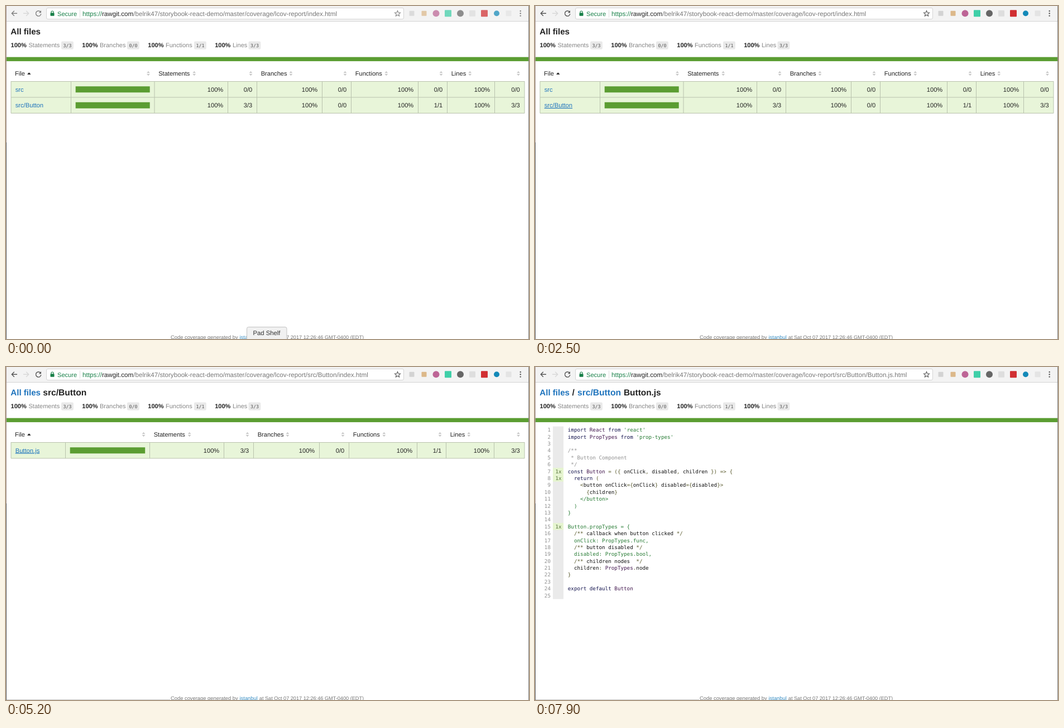
Animation of 937 by 598 pixels, one loop 8 s. Source, as an HTML page:

```html
<!DOCTYPE html>
<html lang="en">
<head>
<meta charset="utf-8">
<title>Coverage report</title>
<style>
html, body { margin: 0; width: 100%; height: 100%; overflow: hidden; background: #fff; }
svg { display: block; width: 937px; height: 598px; font-family: "Liberation Sans", Arial, sans-serif; text-rendering: geometricPrecision; }
.mono { font-family: "DejaVu Sans Mono", monospace; white-space: pre; }
</style>
</head>
<body>
<svg id="stage" viewBox="0 0 937 598" xmlns="http://www.w3.org/2000/svg"></svg>
<script>
const LOOP = 8000;
const GREEN = '#5b9d32', PALE = '#e8f5d9', RULE = '#b9c2ad', LINK = '#1f74bd', INK = '#222';

const rect = (x, y, w, h, fill, more = '') =>
  `<rect x="${x}" y="${y}" width="${w}" height="${h}" fill="${fill}" ${more}/>`;
const path = (d, stroke, width = 1, more = '') =>
  `<path d="${d}" fill="none" stroke="${stroke}" stroke-width="${width}" ${more}/>`;
const shape = (d, fill) => `<path d="${d}" fill="${fill}"/>`;
const dot = (x, y, r, fill) => `<circle cx="${x}" cy="${y}" r="${r}" fill="${fill}"/>`;
const text = (x, y, size, fill, content, more = '') =>
  `<text x="${x}" y="${y}" font-size="${size}" fill="${fill}" ${more}>${content}</text>`;
const group = (id, content) => `<g id="${id}">${content}</g>`;
const BOLD = 'font-weight="700"', END = 'text-anchor="end"';

function toolbar() {
  const star = Array.from({ length: 10 }, (_, i) => {
    const a = -Math.PI / 2 + i * Math.PI / 5, r = i % 2 ? 2.4 : 5.3;
    return `${(701.5 + r * Math.cos(a)).toFixed(1)} ${(13.7 + r * Math.sin(a)).toFixed(1)}`;
  }).join('L');
  const square = (x, size, fill) => rect(x - size / 2, 13.3 - size / 2, size, size, fill, 'rx="1"');
  const icons = square(727, 9, '#d3d3d3') + square(749, 9, '#dcb88a') + dot(770.5, 13.3, 6, '#bd6596') +
    square(792, 12, '#3fcfa8') + dot(814, 13.3, 6, '#666') + square(835.5, 11, '#dedede') +
    square(857, 12, '#d12f32') + dot(879, 13.3, 5, '#1489b8') + square(900.5, 10, '#e4e4e4');
  const controls =
    path('M20 13.3H10.5M14.8 8.8L10.3 13.3L14.8 17.8', '#555', 1.4) +
    group('reload', path('M61.6 10.2A4.7 4.7 0 1 0 62.8 14.2', '#555', 1.4) + shape('M63 8V12.3H58.7Z', '#555')) +
    group('stop', path('M53.7 9L62.3 17.6M62.3 9L53.7 17.6', '#555', 1.4)) +
    path(`M${star}Z`, '#555', 1.1) + [9, 13.3, 17.6].map(y => dot(921.7, y, 1.2, '#555')).join('');
  return rect(0, 0, 937, 27, '#f3f3f3') + rect(0, 27, 937, 1, '#d2d2d2') +
    rect(72.5, 3.5, 640, 20, '#fff', 'rx="2.5" stroke="#d4d4d4"') +
    path('M31 13.3H40.5M36.2 8.8L40.7 13.3L36.2 17.8', '#d8d8d8', 1.4) +
    group('active', controls + icons) +
    rect(79.5, 12.3, 7, 5.4, '#188048', 'rx=".7"') + path('M81 12.5V11a2 2 0 0 1 4 0V12.5', '#188048', 1.2) +
    text(92, 17.5, 11.1, '#188048', 'Secure') + rect(132, 6, 1, 15, '#dedede') +
    text(137, 17.5, 11.65, '#777', '<tspan fill="#188048">https://</tspan><tspan fill="#222">rawgit.com</tspan>' +
      '/belrik47/storybook-react-demo/master/coverage/lcov-report/<tspan id="tail"></tspan>');
}

function summary() {
  const items = [[8.5, 40.5, 99, 'Statements', '3/3'], [136.3, 168, 217, 'Branches', '0/0'],
    [254.3, 286, 337, 'Functions', '1/1'], [374.2, 406, 434.5, 'Lines', '3/3']];
  return items.map(([x, labelX, badgeX, label, count]) =>
    text(x, 74, 11.05, INK, '100%', BOLD) + text(labelX, 74, 11, '#858585', label) +
    rect(badgeX, 63.5, 21.8, 14.3, '#e9e9e9', 'rx="2"') +
    text(badgeX + 3.4, 73.7, 8.3, '#555', count, 'class="mono"')).join('') +
    rect(0, 91.7, 937, 7.4, GREEN);
}

const sorter = x => shape(`M${x - 2.9} 120.2l2.9-3.3l2.9 3.3zm0 1.7l2.9 3.3l2.9-3.3z`, '#c6c6c6');

// lines: the inner column borders; the table itself spans 9 to 929
function table(lines, rows) {
  const edges = [...lines, 929], bottom = 135.5 + rows.length * 28.5;
  const heads = [['Statements', 64], ['Branches', 53.7], ['Functions', 55.6], ['Lines', 33.5]];
  let out = text(16, 125, 11.1, INK, 'File') + shape('M38 123l3.3-3.8l3.3 3.8z', INK) + sorter(edges[1] - 11);
  heads.forEach(([label, gap], i) => {
    const x = edges[i * 2 + 1] + 7.2;
    out += text(x, 125, 11.1, INK, label) + sorter(x + gap) + sorter(edges[i * 2 + 3] - 11);
  });
  out += rect(9, 135.5, 920, bottom - 135.5, PALE);
  rows.forEach(([name, id, ...counts], i) => {
    const y = 135.5 + i * 28.5, base = y + 18;
    out += text(16.7, base, 11.2, LINK, name, `id="${id}"`) +
      rect(edges[0] + 8.2, y + 8.8, edges[1] - edges[0] - 16.5, 11, GREEN);
    counts.forEach((count, j) => {
      out += text(edges[j * 2 + 2] - 8.3, base, 11.1, INK, '100%', END) +
        text(edges[j * 2 + 3] - 8.3, base, 11.1, INK, count, END);
    });
    out += path(`M9 ${y}H929`, RULE);
  });
  return out + path(`M9 ${bottom}H929M` + [9, ...edges].map(x => `${x} 135V${bottom}`).join('M'), RULE);
}

// "~" plus a letter switches the ink within a line
const INKS = { k: '#15154f', t: '#43184f', s: '#287c35', c: '#929292', p: '#59592b', b: '#111' };
const SOURCE = `~kimport ~tReact ~kfrom ~s'react'
~kimport ~tPropTypes ~kfrom ~s'prop-types'

~c/**
~c * Button Component
~c */
~kconst ~tButton ~p= ({ ~bonClick~p, ~bdisabled~p, ~bchildren ~p}) => {
  ~kreturn ~p(
    ~p<~bbutton onClick~p={~bonClick~p} ~bdisabled~p={~bdisabled~p}>
      ~p{~bchildren~p}
    ~s</button>
  ~s)
~s}

~sButton.propTypes = {
  ~p/** ~bcallback when button clicked ~p*/
  ~sonClick: PropTypes.func,
  ~p/** ~bbutton disabled ~p*/
  ~sdisabled: PropTypes.bool,
  ~p/** ~bchildren nodes  ~p*/
  ~bchildren~p: ~tPropTypes~p.~bnode
~p}

~kexport default ~tButton
`;

function listing() {
  const mono = 'class="mono"', pitch = 12.39, covered = [7, 8, 15];
  const escape = s => s.replace(/</g, '&lt;').replace(/>/g, '&gt;');
  return rect(32, 106.7, 19, 310, '#eaeaea') + SOURCE.split('\n').map((line, i) => {
    const y = 116.3 + i * pitch;
    const [indent, ...parts] = line.split('~');
    const spans = parts.map(p => `<tspan fill="${INKS[p[0]]}">${escape(p.slice(1))}</tspan>`).join('');
    const hit = covered.includes(i + 1)
      ? rect(32, y - 9.6, 19, pitch, '#e6f5d0') + text(36.4, y, 9.26, '#58753f', '1x', mono) : '';
    return hit + text(28, y, 9.26, '#8f8f8f', i + 1, `${mono} ${END}`) +
      text(58.8, y, 9.26, INK, indent + spans, mono);
  }).join('');
}

const title = (x, size, fill, content) => text(x, 51.2, size, fill, content, BOLD);
const pages = [
  title(8.3, 15.1, INK, 'All files') +
    table([116.5, 266, 397.5, 449.5, 566.5, 618.5, 738.5, 790.5, 875.5], [
      ['src', 'srcLink', '0/0', '0/0', '0/0', '0/0'],
      ['src/Button', 'folderLink', '3/3', '0/0', '1/1', '3/3']]),
  title(8.3, 15.1, LINK, 'All files') + title(66.3, 15.6, INK, 'src/Button') +
    table([106.5, 257.5, 390.5, 443.5, 561.5, 614.5, 736.5, 788.5, 874.5], [
      ['Button.js', 'fileLink', '3/3', '0/0', '1/1', '3/3']]),
  title(8.3, 15.1, LINK, 'All files') + title(66.5, 15.6, INK, '/') +
    title(76, 15.6, LINK, 'src/Button') + title(159, 15.4, INK, 'Button.js') + listing()
];
const tails = ['index.html', 'src/Button/index.html', 'src/Button/Button.js.html'];

const footer = text(295, 597.8, 9.37, '#777', 'Code coverage generated by') +
  text(418.5, 597.8, 9.4, '#3a8fc4', 'istanbul') +
  text(453.8, 597.8, 9.17, '#777', 'at Sat Oct 07 2017 12:26:46 GMT-0400 (EDT)');
const tooltip = rect(431.5, 576.5, 71.5, 24, '#f1f1f1', 'rx="3" stroke="#c2c2c2"') +
  text(467, 590.7, 11.3, '#333', 'Pad Shelf', 'text-anchor="middle"');
const edges = rect(0, 0, 1, 245, '#a99694') + rect(0, 245, 1, 353, '#5c5e62') + rect(936, 0, 1, 598, '#808080');

const $ = id => document.getElementById(id);
$('stage').innerHTML = rect(0, 0, 937, 598, '#fff') + toolbar() + summary() +
  pages.map((page, i) => group('page' + i, page)).join('') + footer +
  group('baseline', rect(0, 597, 294, 1, '#c8c8c8')) + group('tooltip', tooltip) + edges;

const show = (id, on) => $(id).setAttribute('display', on ? 'inline' : 'none');
const underline = (id, on) => $(id).setAttribute('text-decoration', on ? 'underline' : 'none');
const within = (t, from, to) => t >= from && t < to;

function render(t) {
  const page = t < 3400 ? 0 : t < 7700 ? 1 : 2;
  const loading = within(t, 2900, 3400) || within(t, 7300, 7700);
  pages.forEach((_, i) => show('page' + i, i === page));
  $('tail').textContent = tails[page];
  show('tooltip', t < 400);
  show('baseline', page > 0);
  show('stop', loading);
  show('reload', !loading);
  underline('folderLink', t >= 1900);
  underline('fileLink', t >= 5200);
  $('active').setAttribute('opacity', t < 1900 ? 0.72 : 1);
}

function tick(now) {
  render(now % LOOP);
  requestAnimationFrame(tick);
}
render(0);
requestAnimationFrame(tick);
</script>
</body>
</html>
```
